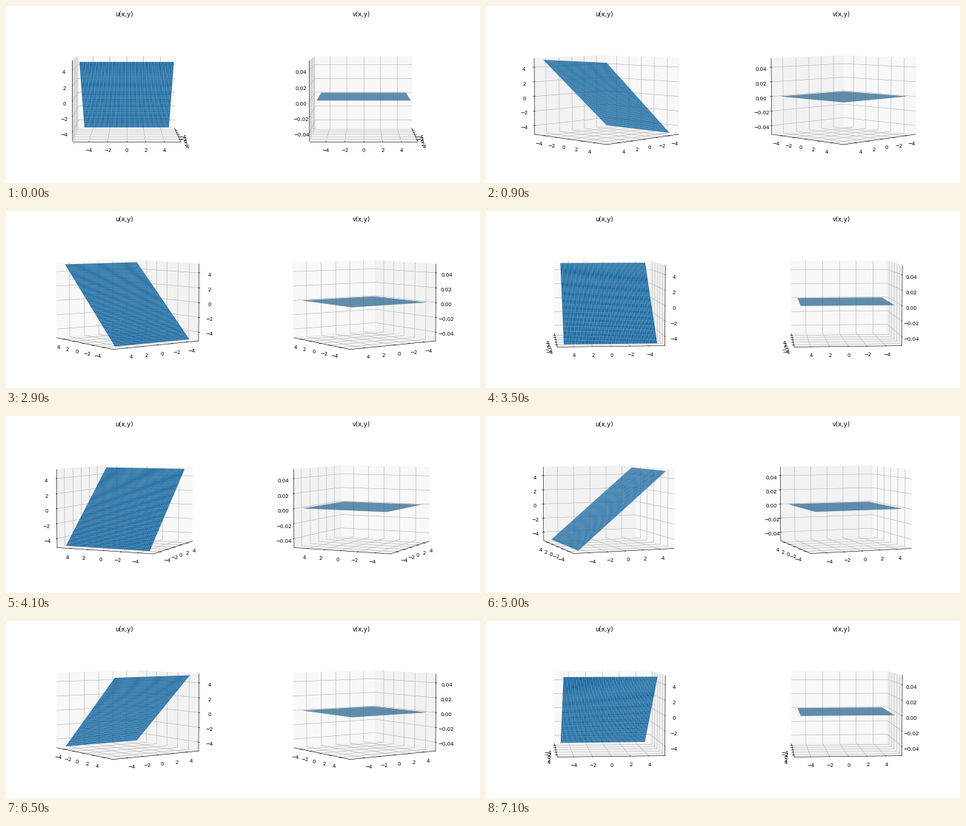
Recreate the animation shown at these times as a matplotlib script. Size 640x240 px, loop 7.2 s.

```python
import numpy as np
import matplotlib.pyplot as plt
from matplotlib.animation import FuncAnimation

FRAMES, INTERVAL = 72, 100
DPI = 50
PAD = 25 / 24  # panes stand a little outside the limits
BOTTOM, HEIGHT = 7.3 / 240, 214.3 / 240

fig = plt.figure(figsize=(640 / DPI, 240 / DPI), dpi=DPI)
grid = np.linspace(-5, 5, 50)
X, Y = np.meshgrid(grid, grid)


def add_surface(left, Z, title, zmax):
    ax = fig.add_axes([left, BOTTOM, 0.5, HEIGHT], projection="3d")
    ax.plot_surface(X, Y, Z)
    ax.set_xlim(-5.5 * PAD, 5.5 * PAD)
    ax.set_ylim(-5.5 * PAD, 5.5 * PAD)
    ax.set_zlim(-zmax * PAD, zmax * PAD)
    ax.set_title(title)
    return ax


axes = [
    add_surface(0, X, "u(x,y)", 5),
    add_surface(0.5, np.zeros_like(X), "v(x,y)", 0.05),
]


def update(i):
    for ax in axes:
        ax.view_init(elev=5, azim=360 / FRAMES * i)
    return axes


anim = FuncAnimation(fig, update, frames=FRAMES, interval=INTERVAL, repeat=True)
plt.show()
```
